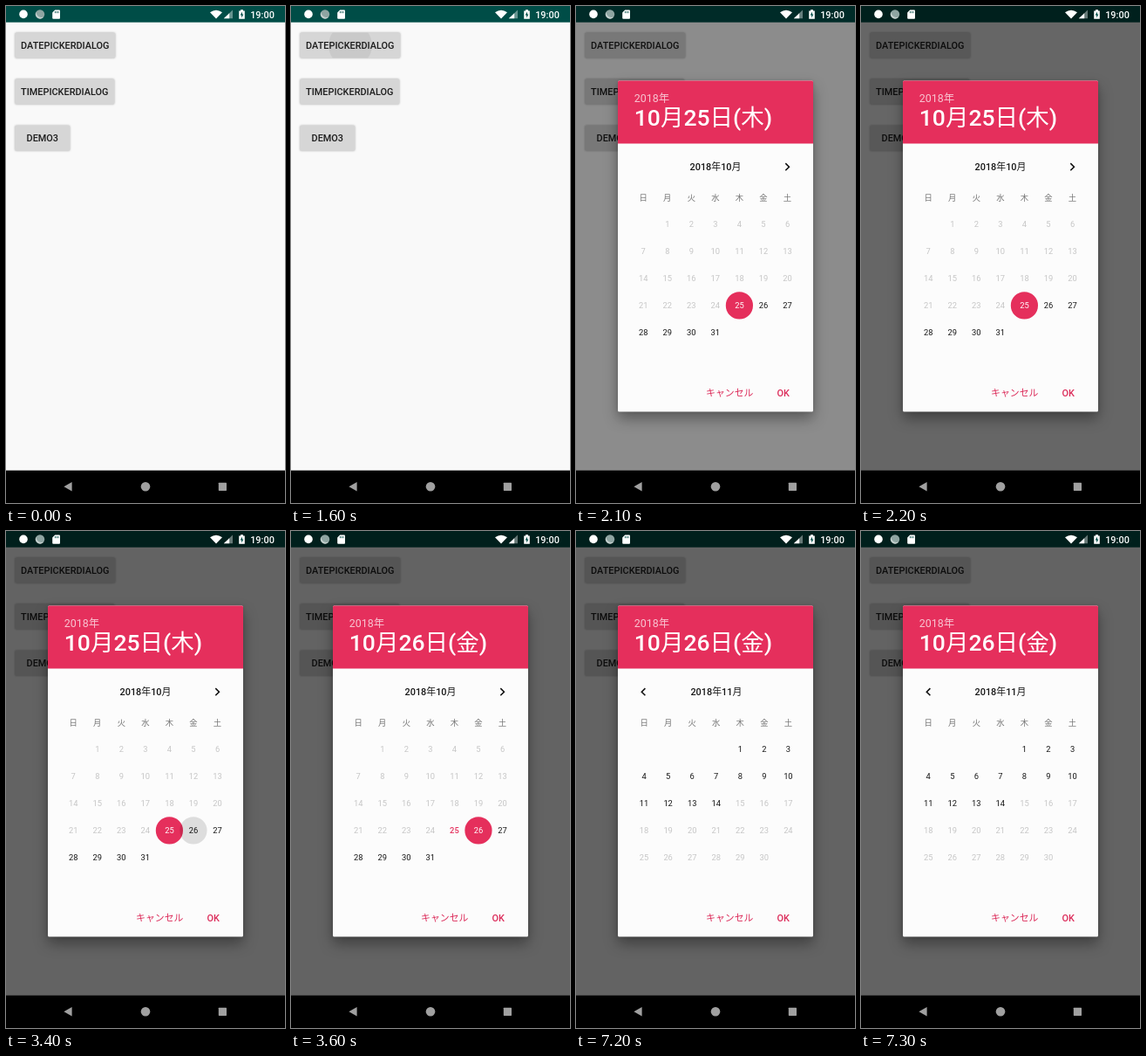
Recreate the animation shown at these times as an HTML page. Size 320x569 px, loop 8000 ms.

```html
<!DOCTYPE html>
<html lang="ja">
<head>
<meta charset="utf-8">
<title>Date picker dialog</title>
<style>
  html, body { margin: 0; width: 100%; height: 100%; overflow: hidden; background: #000; }
  svg { display: block; width: 100vw; height: 100vh; }
  text { font-family: Roboto, "Noto Sans CJK JP", "Noto Sans CJK", sans-serif; font-size: 10.9px; }
  .mid { text-anchor: middle; }
  .med { font-weight: 500; }
  .day { font-size: 9.34px; text-anchor: middle; }
  .btn { fill: #d6d6d6; filter: drop-shadow(0 .9px .8px rgba(0, 0, 0, .28)); }
  .sheet { fill: #fcfcfc; filter: drop-shadow(0 8px 8px rgba(0, 0, 0, .32)) drop-shadow(0 0 2px rgba(0, 0, 0, .15)); }
</style>
</head>
<body>
<svg id="stage" viewBox="0 0 320 569" preserveAspectRatio="none">
  <defs>
    <clipPath id="pagerClip"><rect x="48" y="158" width="224" height="265"/></clipPath>
    <clipPath id="pressClip"><rect x="10.3" y="30.5" width="115" height="29" rx="1.5"/></clipPath>
    <path id="chevron" d="M-3.41 4.59L1.17 0-3.41-4.59-2-6l6 6-6 6z"/>
  </defs>

  <rect width="320" height="532" fill="#f9f9f9"/>
  <rect width="320" height="18.7" fill="#004d47"/>
  <g id="buttons"></g>
  <g clip-path="url(#pressClip)"><circle id="press" cx="68" cy="45"/></g>
  <rect id="dim" width="320" height="532"/>

  <!-- status bar -->
  <g fill="#fff">
    <circle cx="20" cy="9.4" r="4.8"/>
    <circle cx="39" cy="9.4" r="5.2" fill="#8fa5a2"/>
    <path d="M34.6 6.6A5.2 5.2 0 1 0 43.4 12.2A6 6 0 0 1 34.6 6.6Z" fill="#c3cfcd"/>
    <path d="M56.2 4.4H61q1 0 1 1V13.8q0 1-1 1H54.2q-1 0-1-1V7.4Z"/>
    <path d="M56.4 6v2.2M58.2 6v2.2M60 6v2.2" stroke="#004d47" stroke-width=".8"/>
    <path d="M234 7.3Q241 2 248 7.3L241 14.6Z"/>
    <path d="M260 4.6V14.3H249.8Z" opacity=".4"/>
    <path d="M256.2 8.2V14.3H249.8Z"/>
    <path d="M267.2 5.4H269V4.2H272V5.4H273.8V14.8H267.2Z"/>
    <path d="M271 6.6L268.7 10.6H270.2V13.4L272.4 9.5H271Z" fill="#004d47"/>
    <text x="294" y="13.5" class="mid med">19:00</text>
  </g>

  <!-- navigation bar -->
  <rect y="531.7" width="320" height="38" fill="#000"/>
  <g fill="#a0a0a0">
    <path d="M66.4 550.3L75.6 545V555.6Z"/>
    <circle cx="160" cy="550.3" r="5.3"/>
    <rect x="243.8" y="545.7" width="9.2" height="9.2" rx=".6"/>
  </g>

  <g id="dialog">
    <rect class="sheet" x="48" y="85.6" width="224" height="378.8" rx="1.5"/>
    <path d="M48 157.6V87.1q0-1.5 1.5-1.5H270.5q1.5 0 1.5 1.5V157.6Z" fill="#e52f5c"/>
    <text x="66.8" y="109.8" fill="#fff" fill-opacity=".72" style="font-size:12.45px">2018年</text>
    <text id="date" class="med" x="66.8" y="137.4" fill="#fff" style="font-size:26.5px"></text>
    <g clip-path="url(#pagerClip)"><g id="pager"></g></g>
    <use id="prev" href="#chevron" transform="translate(77.3 184.2) scale(-.778 .778)" fill="#111"/>
    <use id="next" href="#chevron" transform="translate(242.4 184.2) scale(.778)" fill="#111"/>
    <g fill="#dc2c5a" class="med">
      <text x="149" y="446.7">キャンセル</text>
      <text x="237.8" y="446.7" class="mid">OK</text>
    </g>
  </g>
</svg>

<script>
const LOOP = 8000, STEP = 100, PAGE = 224;
const ACCENT = '#e52f5c', INK = '#161616', FAINT = '#c6c6c6';
const $ = id => document.getElementById(id);

function add(parent, tag, attrs, text) {
  const el = document.createElementNS('http://www.w3.org/2000/svg', tag);
  for (const k in attrs) el.setAttribute(k, attrs[k]);
  if (text !== undefined) el.textContent = text;
  return parent.appendChild(el);
}
function set(el, attrs) {
  for (const k in attrs) el.setAttribute(k, attrs[k]);
}
const colX = c => 77.2 + 27.55 * c;
const rowY = r => 249.6 + 31.1 * r;

[['DATEPICKERDIALOG', 115], ['TIMEPICKERDIALOG', 114], ['DEMO3', 63]].forEach(([label, w], i) => {
  const y = 30.5 + 53.1 * i;
  add($('buttons'), 'rect', { class: 'btn', x: 10.3, y, width: w, height: 29, rx: 1.5 });
  add($('buttons'), 'text', { class: 'mid med', x: 10.3 + w / 2, y: y + 18.7, fill: '#1c1c1c' }, label);
});

// One calendar page; days from..to can be picked.
function month(page, title, firstCol, count, from, to) {
  const g = add($('pager'), 'g', { transform: `translate(${page * PAGE})` });
  add(g, 'text', { class: 'mid med', x: 160, y: 188, fill: INK }, title);
  [...'日月火水木金土'].forEach((d, c) =>
    add(g, 'text', { class: 'day', x: colX(c), y: 223, fill: '#757575' }, d));
  const spot = add(g, 'circle', { r: 15.6, fill: 'none' });
  const days = [];
  for (let d = 1; d <= count; d++) {
    const cell = firstCol + d - 1, x = colX(cell % 7), y = rowY(Math.floor(cell / 7));
    const fill = d >= from && d <= to ? INK : FAINT;
    days[d] = { x, y, el: add(g, 'text', { class: 'day', x, y: y + 3.3, fill }, d) };
  }
  return { spot, days };
}
const oct = month(0, '2018年10月', 1, 31, 25, 31);
month(1, '2018年11月', 4, 30, 1, 14);
const touch = add($('pager'), 'circle', { cx: oct.days[26].x, cy: oct.days[26].y, r: 15.6, fill: '#000' });

const ramp = (t, start, values) =>
  t < start ? 0 : values[Math.min(values.length - 1, Math.floor((t - start) / STEP))];

function render(ms) {
  const t = Math.floor((ms % LOOP) / STEP) * STEP;

  // button press, then the dialog fades in over a dimmed screen
  set($('press'), { r: ramp(t, 1600, [25, 45, 60]), opacity: ramp(t, 1600, [.06, .1, .12, .08, .03, 0]) });
  set($('dim'), { opacity: ramp(t, 2000, [.02, .44, .59, .6]) });
  set($('dialog'), { opacity: ramp(t, 2000, [.37, 1]) });

  // selected day
  const picked = t >= 3500, day = oct.days[picked ? 26 : 25];
  $('date').textContent = picked ? '10月26日(金)' : '10月25日(木)';
  set(oct.spot, { cx: day.x, cy: day.y, fill: ACCENT });
  set(oct.days[25].el, { fill: picked ? ACCENT : '#fff', 'font-weight': picked ? 500 : 400 });
  set(oct.days[26].el, { fill: picked ? '#fff' : INK });
  set(touch, { opacity: t === 3400 ? .12 : 0 });

  // page swipe with a quintic ease-out
  const p = t < 7100 ? 0 : Math.min(1, (t - 7066) / 200);
  const swipe = 1 - (1 - p) ** 5;
  set($('pager'), { transform: `translate(${-PAGE * swipe})` });
  set($('prev'), { opacity: p ? Math.abs(.5 - swipe) * 2 : 0 });
  set($('next'), { opacity: p ? 0 : 1 });
}

const start = performance.now();
function tick() {
  render(performance.now() - start);
  requestAnimationFrame(tick);
}
tick();
</script>
</body>
</html>
```
